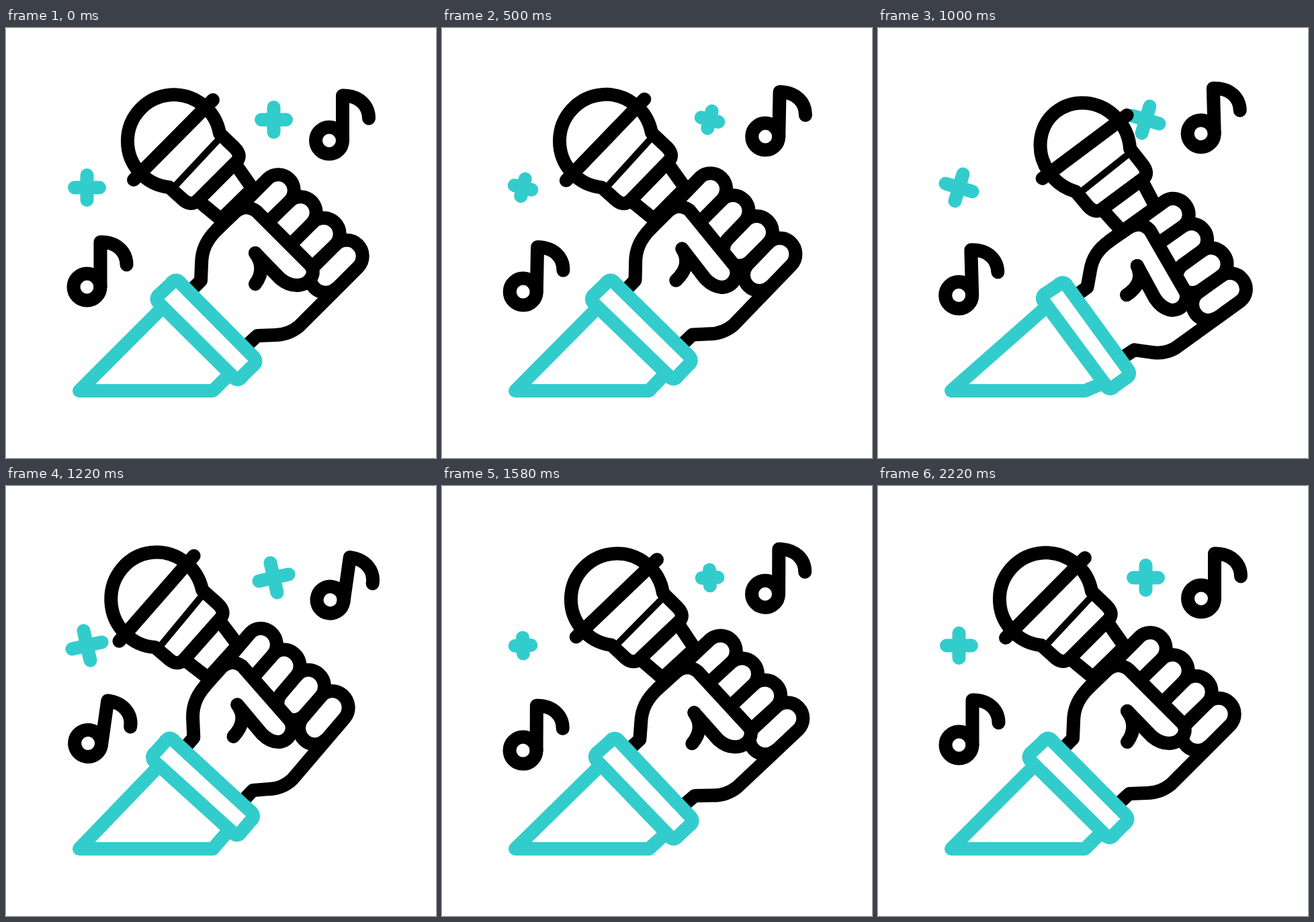
An HTML page for the animation above (2.4 s loop, 640 by 640 pixels).

```html
<!DOCTYPE html>
<html lang="en">
<head>
<meta charset="utf-8">
<title>Microphone in hand</title>
<style>
  html, body { margin: 0; height: 100%; overflow: hidden; background: #fff; }
  svg { display: block; width: 100%; height: 100%; }
  path, circle {
    fill: none; stroke: #000; stroke-width: 20;
    stroke-linecap: round; stroke-linejoin: round;
    vector-effect: non-scaling-stroke;
  }
  .teal, .teal * { stroke: #33cccc; }
  .solid { fill: #fff; }
</style>
</head>
<body>
<svg viewBox="0 0 640 640">
  <defs>
    <g id="note">
      <circle r="20"/>
      <path d="M20,0V-67C46,-67 59,-51 59,-33"/>
    </g>
  </defs>
  <g class="teal">
    <path id="plusLeft"/>
    <path id="plusRight"/>
    <use id="noteLeft" href="#note"/>
    <use id="noteRight" href="#note"/>
  </g>
  <g id="mic">
    <path class="solid" d="M341,202L367,239L320,285L291,261"/>
    <path class="solid" d="M243,237L264,256Q276,266 286,256L344,198Q351,189 340,178L318,157Z"/>
    <path class="solid" d="M243,237A69,69 0 1 1 318,157"/>
    <path d="M308,107L190,226"/>
  </g>
  <g id="hand">
    <path class="solid" d="M268,398L290,376L291,352C291,330 299,315 314,300L390,224
      A23.4,23.4 0 0 1 423,257A23.4,23.4 0 0 1 456,290
      A23.4,23.4 0 0 1 490,323A23.4,23.4 0 0 1 524,356
      L436,444Q420,457 400,457L374,458L350,480Z"/>
    <path d="M423,257L389,290M456,290L428.5,317.5
      M490,323L461.5,350.5A23.4,23.4 0 0 1 428.5,317.5
      M490,323L458,355A23.4,23.4 0 0 0 491,388"/>
    <path id="thumb" class="solid"/>
    <path id="crease"/>
  </g>
  <path id="sleeve" class="teal"/>
  <g id="cuff" class="teal">
    <path class="solid" d="M245,381Q253,370 261,381L366,487Q377,496 366,504
      L352,518Q344,529 336,517L230,412Q219,403 230,395Z"/>
  </g>
</svg>
<script>
const LOOP = 2400;
const $ = id => document.getElementById(id);

// Each track is a list of [time in ms, value], eased between neighbours.
const tracks = {
  swing: [[180, 0], [380, -.42], [780, 1.05], [960, 1.05], [1240, -.43], [1700, .3], [2220, 0]],
  grip: [[180, 0], [380, 1], [1240, 1], [1700, 0]],
  bob: [[180, 0], [420, -9.5], [700, 8.3], [980, -10.5], [1260, 2.8], [1540, -7.3], [1830, 2.5], [2220, 0]],
  tilt: [[420, 0], [700, 5.8], [980, -1.7], [1260, 8.6], [1540, 0], [1830, 5], [2220, 0]],
  reach: [[180, 18.5], [620, 12], [1160, 23.2], [1620, 11.6], [2220, 18.5]],
  spin: [[260, 0], [820, 36], [1240, -13], [1700, 0]]
};

// Affine offsets from rest at full right swing and at LEFT swing.
const LEFT = -.42;
const bends = {
  hand: {
    right: [-.043, .179, -.135, -.042, 85.4, -25.6],
    left: [-.032, -.042, .083, 0, -32.9, 10.6]
  },
  mic: {
    right: [-.041, .18, -.108, -.04, 89, -27.1],
    left: [-.005, -.042, .054, .0256, -33.3, 7.2]
  }
};

function valueAt(keys, t) {
  const next = keys.findIndex(key => key[0] > t);
  if (next === 0) return keys[0][1];
  if (next < 0) return keys[keys.length - 1][1];
  const [t0, a] = keys[next - 1], [t1, b] = keys[next];
  const u = (t - t0) / (t1 - t0);
  return a + (b - a) * u * u * (3 - 2 * u);
}

// Quadratic through the left, rest and right poses.
function bendMatrix({ right, left }, s) {
  return right.map((r, i) => {
    const linear = (left[i] - LEFT * LEFT * r) / (LEFT - LEFT * LEFT);
    return linear * s + (r - linear) * s * s + (i === 0 || i === 3 ? 1 : 0);
  });
}

const apply = ([a, b, c, d, e, f], x, y) => `${a * x + c * y + e},${b * x + d * y + f}`;

function drawPlus(id, x, y, reach, spin) {
  $(id).setAttribute('d', `M${-reach},0H${reach}M0,${-reach}V${reach}`);
  $(id).setAttribute('transform', `translate(${x} ${y}) rotate(${spin})`);
}

function drawNote(id, x, y, tilt) {
  $(id).setAttribute('transform', `translate(${x + .2 * tilt} ${y}) rotate(${tilt})`);
}

function drawHand(swing, grip) {
  const hand = bendMatrix(bends.hand, swing);
  const mic = bendMatrix(bends.mic, swing);
  $('mic').setAttribute('transform', `matrix(${mic})`);
  $('hand').setAttribute('transform', `matrix(${hand})`);
  $('cuff').setAttribute('transform', `matrix(${hand})`);
  $('sleeve').setAttribute('d',
    `M${apply(hand, 231, 418)}L109,540H308L${apply(hand, 327, 521)}`);

  const pull = (x, y, dx, dy) => `${x + dx * grip},${y + dy * grip}`;
  const tip = pull(371, 335, -10, -5);
  $('thumb').setAttribute('d', `M314,300L341,274Q357,261 373,273
    L${pull(453, 353, -14, 3)}C${pull(463, 365, -16, 4)} ${pull(452, 383, -15, 5)} ${pull(433, 383, -14, 5)}
    Q${pull(420, 383, -14, 4)} ${pull(408, 373, -13, 2)}L${tip}`);
  $('crease').setAttribute('d',
    `M${tip}Q${pull(388, 358, -12, -4)} ${pull(371, 381, -20, -4)}`);
}

function draw(t) {
  const now = {};
  for (const name in tracks) now[name] = valueAt(tracks[name], t);
  drawPlus('plusLeft', 120.5, 237.5, now.reach, now.spin);
  drawPlus('plusRight', 398.5, 136.5, now.reach, now.spin);
  drawNote('noteLeft', 120.5, 385.5 - 1.2 * now.bob, now.tilt);
  drawNote('noteRight', 481, 167.5 + now.bob, now.tilt);
  drawHand(now.swing, now.grip);
}

const start = performance.now();
function tick() {
  draw((performance.now() - start) % LOOP);
  requestAnimationFrame(tick);
}
tick();
</script>
</body>
</html>
```
